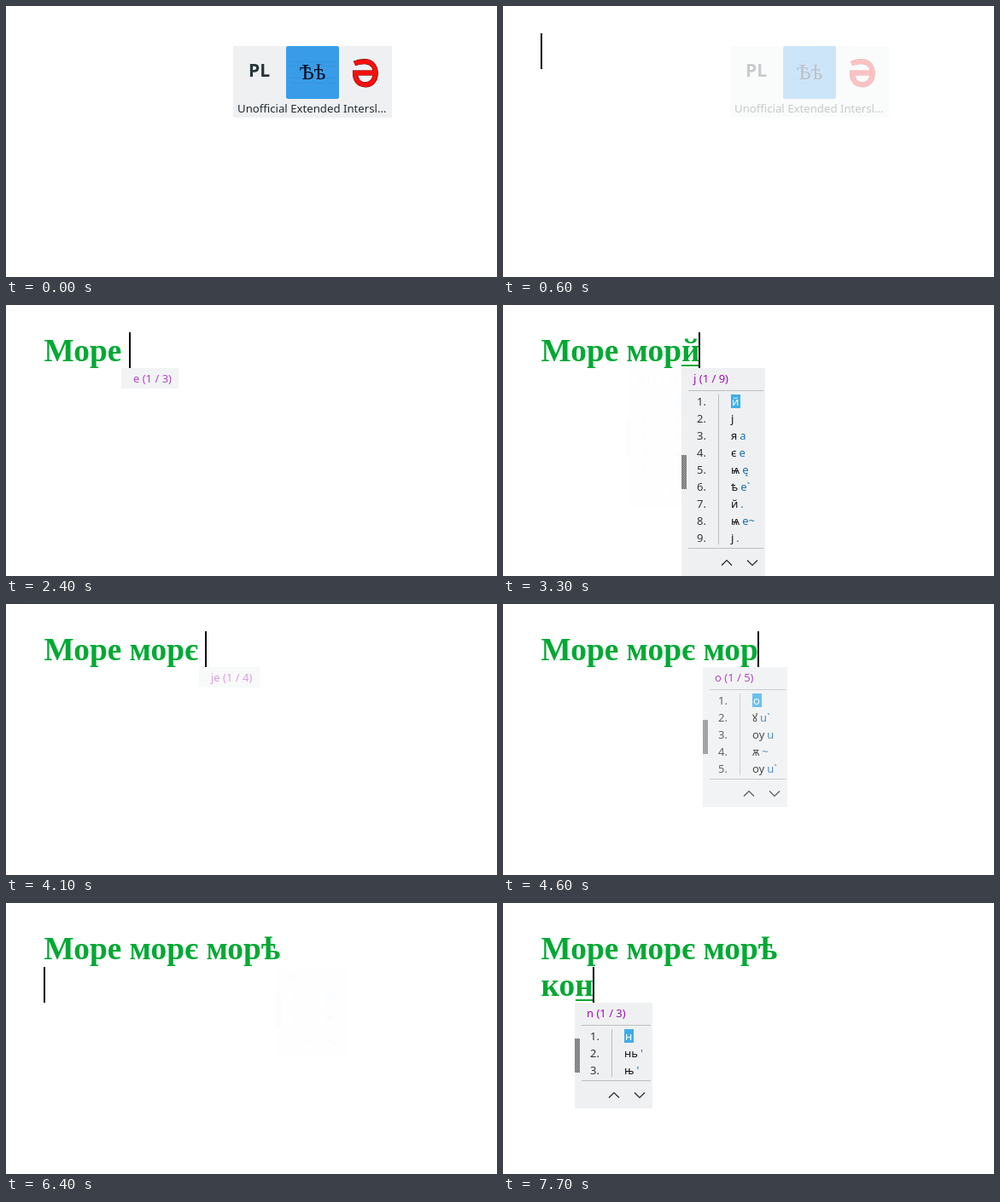
Recreate the animation shown at these times as an HTML page with a canvas. Size 575x318 px, loop 8000 ms.

```html
<!DOCTYPE html>
<html lang="en">
<head>
<meta charset="utf-8">
<title>Typing with candidate popups</title>
<style>
html, body { margin: 0; width: 100%; height: 100%; overflow: hidden; background: #fff; }
canvas { display: block; }
</style>
</head>
<body>
<canvas id="stage" width="575" height="318"></canvas>
<script>
const LOOP = 8000, W = 575, H = 318, LEFT = 44.5;
const SERIF = 'bold 37.33px "Liberation Serif", serif';
const UI = '13px "Noto Sans", "DejaVu Sans", sans-serif';
const CAPTION = '13.2px "Noto Sans", sans-serif';

const stage = document.getElementById('stage').getContext('2d');
const layer = document.createElement('canvas');
layer.width = W;
layer.height = H;
const g = layer.getContext('2d');

// Bursts of activity; the picture rests between them.
const bursts = [[0, 0], [400, 900], [1400, 1400], [1600, 2100], [2400, 2700], [2900, 3300],
  [3500, 3600], [4000, 4800], [4900, 5000], [5400, 5400], [5900, 5900], [6100, 6400],
  [7000, 7300], [7500, 7700]];

// Time, committed text, text being composed.
const A = 'Море ', B = A + 'морє ', C = B + 'морѣ\n';
const keys = [
  [400, '', ''], [1400, 'М', ''], [1600, 'М', 'о'], [1800, 'Мор', ''], [1900, 'Мор', 'е'],
  [2400, A, ''], [2900, A + 'м', 'о'], [3000, A + 'мор', ''], [3100, A + 'мор', 'й'],
  [3500, A + 'мор', 'є'], [4000, B, ''], [4300, B + 'м', ''], [4400, B + 'м', 'о'],
  [4600, B + 'мор', ''], [4700, B + 'мор', 'й'], [4900, B + 'мор', 'є'],
  [5400, B + 'мор', 'ѣ'], [6100, C, ''], [7000, C + 'к', ''], [7100, C + 'к', 'о'],
  [7500, C + 'ко', 'н']
];

// Header, width and rows of each candidate list.
const lists = {
  o: ['o (1 / 5)', 99, ['о', 'ꙋ u`', 'оу u', 'ѫ ~', 'ѹ u`']],
  e: ['e (1 / 3)', 89, ['е', 'ѣ `', 'ѧ ~']],
  j: ['j (1 / 9)', 98, ['й', 'ј', 'я a', 'є e', 'ѩ ę', 'ѣ e`', 'й .', 'ѩ e~', 'ј .']],
  je: ['je (1 / 4)', 91, ['є', 'ѣ `', 'ѩ ~', 'ѥ .']],
  yat: ['je` (1 / 2)', 83, ['ѣ', 'ѥ']],
  n: ['n (1 / 3)', 91, ['н', 'нь \'', 'њ \'']],
  eHead: ['e (1 / 3)', 67, []],
  jeHead: ['je (1 / 4)', 71, []]
};

// List, x, y, start, end, fades in, fades out.
const popups = [
  ['o', 79, 74, 1600, 1800, 1, 1], ['e', 98, 74, 1900, 2400, 1, 0],
  ['eHead', 135, 74, 2400, 2400, 0, 1], ['o', 144, 74, 2900, 3000, 1, 1],
  ['j', 209, 74, 3100, 3500, 1, 0], ['je', 209, 74, 3500, 3600, 0, 0],
  ['je', 230, 74, 3600, 4000, 0, 0], ['jeHead', 226, 74, 4000, 4000, 0, 1],
  ['o', 234, 74, 4400, 4600, 1, 1], ['j', 299, 74, 4700, 4900, 1, 0],
  ['je', 299, 74, 4900, 5000, 0, 0], ['je', 320, 74, 5000, 5400, 0, 0],
  ['yat', 316, 74, 5400, 6100, 0, 1], ['o', 44, 117, 7100, 7500, 1, 0],
  ['n', 84, 117, 7500, LOOP, 1, 0]
];

const fadeIn = dt => Math.min(1, (dt + 60) / 200);
const fadeOut = (dt, span) => Math.max(0, 1 - (dt + 50) / span) ** 2;

function rect(c, color, x, y, w, h) {
  c.fillStyle = color;
  c.fillRect(x, y, w, h);
}

function text(c, str, x, y, font, color) {
  c.font = font;
  c.fillStyle = color;
  c.fillText(str, x, y);
  return x + c.measureText(str).width;
}

function strokePath(path, color, width) {
  g.strokeStyle = color;
  g.lineWidth = width;
  g.stroke(path);
}

// Paints into the layer, then puts it on the stage as one translucent group.
function group(alpha, paint) {
  if (alpha <= 0) return;
  g.clearRect(0, 0, W, H);
  paint();
  stage.globalAlpha = alpha;
  stage.drawImage(layer, 0, 0);
  stage.globalAlpha = 1;
}

function chevron(x, y, dir) {
  strokePath(new Path2D(`M${x - 6} ${y + 3 * dir}L${x} ${y - 3 * dir}L${x + 6} ${y + 3 * dir}`), '#232629', 1.2);
}

function drawPopup(name, x, y) {
  const [head, w, rows] = lists[name], n = rows.length;
  const h = n ? 64 + 20 * n : 24;
  rect(g, '#eff0f1', x, y, w, h);
  text(g, head, x + 14, y + 17, UI, '#9b0fb3');
  if (!n) return;
  const line = '#bcbec0', foot = y + 31 + 20 * n;
  rect(g, line, x + 8, y + 26, w - 10, 1);
  rect(g, line, x + 8, foot, w - 10, 1);
  rect(g, line, x + 43, y + 31, 1, 20 * n - 4);
  rows.forEach((row, i) => {
    const base = y + 44 + 20 * i, [word, hint] = row.split(' ');
    text(g, i + 1 + '.', x + 18, base, UI, '#31363b');
    if (!i) rect(g, '#3daee9', x + 58, y + 31, 11, 16);
    const end = text(g, word, x + (i ? 58 : 59), base, UI, i ? '#111417' : '#fff');
    if (hint) text(g, hint, end + 3, base, UI, '#1a70ab');
  });
  const top = y + h / 2 - 20;
  rect(g, '#b9babb', x, top, 6, 40);
  for (let r = 0; r < 40; r++)
    for (let c = r % 2; c < 6; c += 2) rect(g, '#555', x + c, top + r, 1, 1);
  chevron(x + w - 45, foot + 17.5, 1);
  chevron(x + w - 15, foot + 17.5, -1);
}

function drawSwitcher() {
  rect(g, '#eff0f1', 266, 47, 186, 84);
  g.fillStyle = '#399ce8';
  g.beginPath();
  g.roundRect(328, 47, 62, 62, 2.5);
  g.fill();
  for (const y of [65, 70, 84, 90])
    for (let x = 335; x < 384; x += 2) rect(g, 'rgba(30, 70, 120, 0.18)', x, y, 1, 1);
  text(g, 'PL', 284, 83, 'bold 21px "Noto Sans", sans-serif', '#28343c');
  text(g, 'Ѣѣ', 344, 86, '25px "Liberation Serif", serif', '#07091c');
  const schwa = new Path2D('M408 67.5C413 65.3 418 65 422 65.3C429 66 432.7 72 432.7 79C432.7 87 428 92.3 421 92.3C413 92.3 409 87 409 78.5H432');
  strokePath(schwa, '#301010', 6.2);
  strokePath(schwa, '#fb0d0d', 5.4);
  text(g, 'Unofficial Extended Intersl…', 271, 125, CAPTION, '#232b31');
}

function drawText(t) {
  const key = keys.findLast(k => k[0] <= t);
  if (!key) return;
  const lines = key[1].split('\n'), last = lines.length - 1;
  let end = LEFT;
  lines.forEach((str, i) => { end = text(stage, str, LEFT, 66 + 43 * i, SERIF, '#00a933'); });
  const top = 32 + 43 * last;
  if (key[2]) {
    const start = end;
    end = text(stage, key[2], start, top + 34, SERIF, '#00a933');
    const from = Math.round(start + 0.5), to = Math.round(end + 0.5);
    rect(stage, '#00a933', from, top + 38, to - from, 2);
  }
  const hidden = t >= 900 && t < 1400 || t >= 5900 && t < 6100;
  if (!hidden) rect(stage, '#000', Math.floor(end - 0.5), top, 2, 42);
}

function draw(time) {
  const [, stop] = bursts.findLast(b => b[0] <= time);
  const t = Math.min(Math.floor(time / 100) * 100, stop);
  rect(stage, '#fff', 0, 0, W, H);
  drawText(t);
  group(t < 400 ? 1 : fadeOut(t - 400, 500), drawSwitcher);
  for (const [name, x, y, from, to, soft, linger] of popups) {
    if (t < from) continue;
    const alpha = t < to ? (soft ? fadeIn(t - from) : 1) : linger ? fadeOut(t - to, 400) : 0;
    group(alpha, () => drawPopup(name, x, y));
  }
}

const begin = performance.now();
function tick() {
  draw((performance.now() - begin) % LOOP);
  requestAnimationFrame(tick);
}
tick();
</script>
</body>
</html>
```
